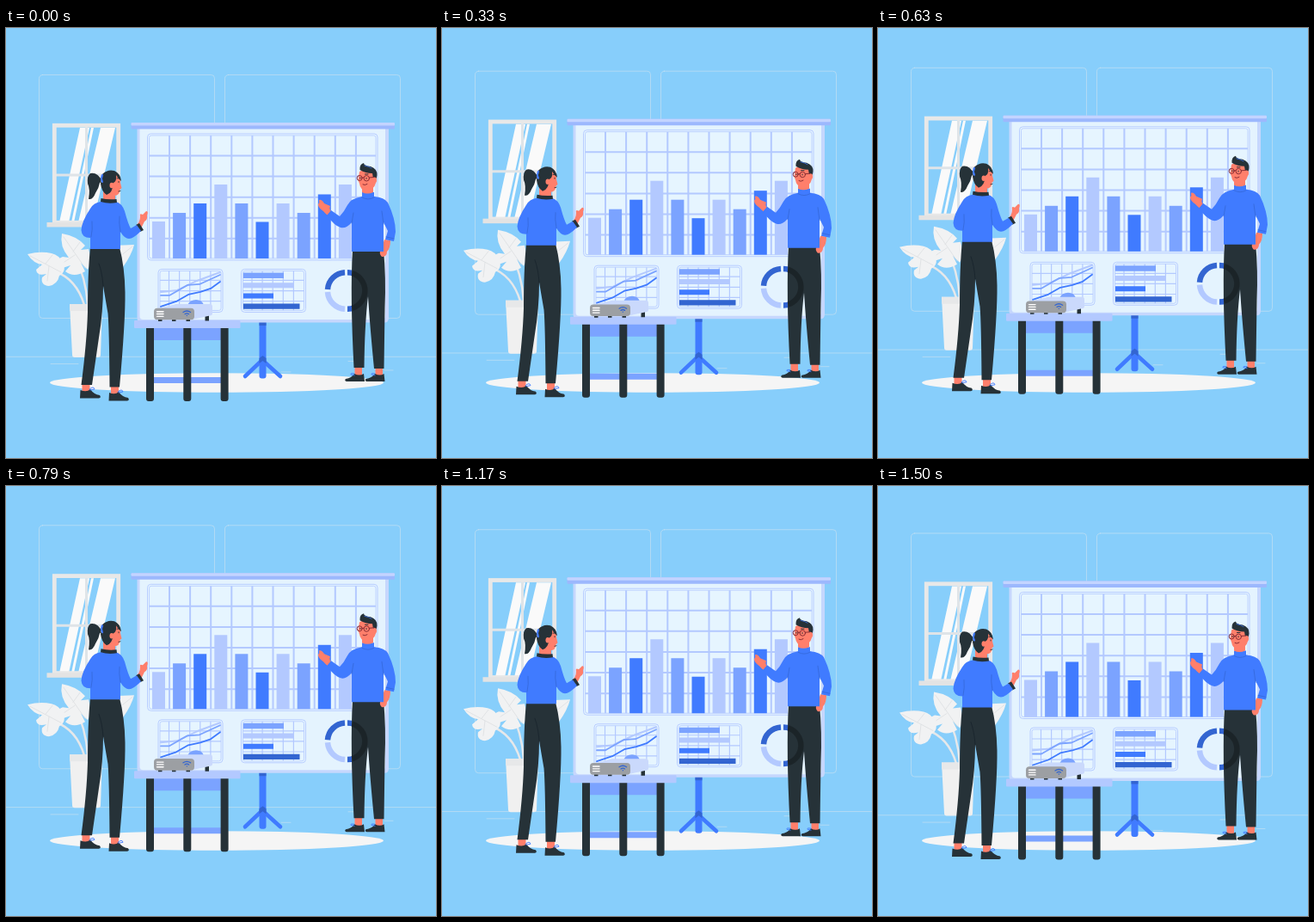
An HTML page that plays this animation: 500 by 500 pixels, repeating every 1540 ms.

```html
<!DOCTYPE html>
<html lang="en">
<head>
<meta charset="utf-8">
<title>Presentation</title>
<style>
  html, body { margin: 0; height: 100%; overflow: hidden; background: #87cefb; }
  svg { display: block; width: 100vw; height: 100vh; }
  .line { fill: none; stroke-linecap: round; stroke-linejoin: round; }
  .ink { fill: #263238; }
  .skin { fill: #ff7f6b; }
  .blue { fill: #407bff; }
  .mid { fill: #7ba3ff; }
  .pale { fill: #b3c9ff; }
  .deep { fill: #3365d1; }
  .leaf { fill: #f1f2f3; }
</style>
</head>
<body>
<svg viewBox="0 0 500 500">
  <g class="float">
    <g class="line" stroke="#ebebeb" stroke-width=".7" opacity=".6">
      <rect x="38.5" y="54.5" width="204" height="283" rx="4"/>
      <rect x="254.5" y="54.5" width="204" height="283" rx="4"/>
      <path d="M0 382.3H500M52 390.6H84M398 387.5H416M428 390.8H433M320 400H331M440 398H450"/>
    </g>

    <g id="window">
      <path fill="#fafafa" d="M86 116H97L73 226H62ZM99 116H102L79 226H76ZM110 116H127L101 226H84Z"/>
      <path class="line" stroke="#dfe4e8" stroke-width="3" d="M59 171H128M93.500 116V226"/>
      <rect x="56.300" y="113.300" width="74.400" height="113" fill="none" stroke="#e8e8e8" stroke-width="4.800"/>
      <rect x="47.500" y="226" width="92" height="5.500" fill="#e3e3e3"/>
    </g>

    <g id="plant">
      <path class="line" stroke="#e6e8ea" stroke-width="2.500" d="M57 283Q82 292 91 322M79 263Q93 290 95 322M134 264Q104 278 98 322"/>
      <path class="leaf" d="M25 263Q40 259 53 262Q62 264 66 273Q71 283 62 288Q60 298 50 300Q40 299 42 290L47 286Q36 289 35 281L42 275Q32 274 25 263Z"/>
      <path class="leaf" d="M65 239Q83 242 92 253L87 258L96 257Q101 272 95 281L87 273L92 283Q79 291 69 283L75 276L63 280Q54 271 66 266L73 267Q62 254 65 239Z"/>
      <path class="leaf" d="M149 252Q146 264 136 278Q125 283 117 270Q113 257 125 253Z"/>
      <path class="line" stroke="#dcdfe1" stroke-width=".8" d="M28 265L64 284M46 274L54 264M50 277L48 294M67 243L92 279M78 260L86 249M80 264L68 272M147 254L122 274"/>
      <path fill="#f0f0f0" d="M74 321H112L110 380Q110 383 107 383H80Q77 383 77 380Z"/>
      <path fill="#e7e8e9" d="M74 321H112L111.700 329H74.300Z"/>
    </g>
  </g>

  <ellipse cx="245" cy="412.500" rx="194" ry="11.300" fill="#f5f5f5"/>

  <g class="float">
    <g id="stand">
      <rect class="blue" x="294.500" y="340" width="8" height="67.500" rx="3"/>
      <path class="line" stroke="#407bff" stroke-width="4.600" d="M298 386L278 405M298 386L319 405"/>
      <path class="deep" d="M294.500 341H302.500V346H294.500ZM294.500 384L298.500 381L302.500 384V390L298.500 387L294.500 390Z"/>
    </g>

    <g id="board">
      <path fill="#c6d7fd" d="M152.500 115H445V337Q445 342.500 440 342.500H157Q152.500 342.500 152.500 337Z"/>
      <path fill="#e4f3fe" d="M155.500 115H441V335Q441 339 437 339H159.500Q155.500 339 155.500 335Z"/>
      <rect x="145.500" y="110" width="306.500" height="7.500" rx="1" fill="#9cb8fd"/>
      <rect x="145.500" y="110" width="306.500" height="3.500" rx="1" fill="#c3d4ff"/>
      <g id="charts"></g>
      <path class="line" stroke="#b3c9ff" stroke-width="2" d="M180 307L199 305L222 294L249 284"/>
      <path class="line" stroke="#7ba3ff" stroke-width="1.800" d="M180 311H190L211 299L225 298L249 287"/>
      <path class="line" stroke="#407bff" stroke-width="1.800" d="M180 324L198 318L212 310L226 307L238 303L249 295"/>
      <path class="mid" d="M276 284.500H323V291H276Z"/>
      <path class="pale" d="M276 296.300H335V302.300H276Z"/>
      <path class="blue" d="M276 308.500H311V314.500H276Z"/>
      <path class="deep" d="M276 320.500H341.500V326.800H276Z"/>
      <g fill="none" stroke-width="6.500">
        <path stroke="#3365d1" d="M374 304A21.300 21.300 0 0 1 394 284.200M397 284.200A21.300 21.300 0 0 1 397 326.800"/>
        <path stroke="#b3c9ff" d="M374 307A21.300 21.300 0 0 0 394 326.800"/>
      </g>
    </g>

    <g id="table">
      <path class="mid" d="M168 347H253V363H168ZM168 406H253V413H168Z"/>
      <path class="ink" d="M163 347H172V431Q172 434 169 434H166Q163 434 163 431ZM206.300 347H215.300V431Q215.300 434 212.300 434H209.300Q206.300 434 206.300 431ZM249.600 347H258.600V431Q258.600 434 255.600 434H252.600Q249.600 434 249.600 431Z"/>
      <rect class="pale" x="149" y="340" width="123.500" height="9" rx="1"/>
    </g>

    <g id="projector">
      <path class="mid" d="M211 322Q214 316 221 316Q228 316 230 322Z"/>
      <path class="ink" d="M177 338H181.500V341H177ZM193 338H197.500V341H193ZM209.500 338H214V341H209.500ZM231.500 333H236V340.500H231.500Z"/>
      <path fill="#cad9fc" d="M177 326L198 321H237Q240 321 240 324V332Q240 334 237 334.500L216 339Z"/>
      <rect x="172" y="325.800" width="47" height="13.600" rx="4" fill="#9c9fa3"/>
      <path class="line" stroke="#fff" stroke-width="1.400" d="M175.500 329.800H183M175.500 332.600H183M175.500 335.400H183"/>
      <path class="line" stroke="#3365d1" stroke-width="1.300" d="M206 330.500Q210.300 327.500 214.600 330.500M208 332.700Q210.300 331 212.600 332.700M210.300 334.500H210.400"/>
    </g>

    <g id="woman">
      <path class="skin" d="M88.500 411H97.500V423H88.500ZM122 414H131V426H122Z"/>
      <path class="ink" d="M86.500 421Q94 424 98 420Q102 426 109 427Q111 430 108 430.500H86ZM120 424Q127 427 131 423Q135 429 142 430Q144 433 141 433.500H119.500Z"/>
      <path class="line" stroke="#407bff" stroke-width=".9" d="M97 420Q102 416 103 420L98 421M130 423Q135 419 136 423L131 424"/>
      <path class="ink" d="M98 255H132Q138 278 138.500 307Q139 340 132 417.500H120.500Q120 350 118.500 332L113 300Q113 330 108 360L100 415H87.500Q94 365 95 330Q95 285 98 255Z"/>
      <path class="line" stroke="#16212a" stroke-width=".7" d="M113 300Q112 285 108 274"/>
      <path class="skin" d="M151 230Q156 226 156 219Q155 215 159 217L163 213Q166 213 164 218Q165 223 161 225L156 235Z"/>
      <path class="ink" d="M151 229L155 227L160 235L156 237Z"/>
      <path class="blue" d="M110 202Q102 203 98 210Q88 225 87.500 235Q88 244 98 244V257H133V237Q138 245 143 245Q148 245 157 236L152 229L145 233Q142 228 138 213Q135 204 128 202Z"/>
      <path class="line" stroke="#3365d1" stroke-width=".7" d="M99 243Q101 234 100 225M133 237Q131 226 132 219"/>
      <path class="skin" d="M113 189H127V200H113ZM119 174L130 170Q134 174 133 180L134.500 186L132.500 188Q132 195 126 195L118 190Z"/>
      <path class="ink" d="M110.500 198Q119 200 128.500 199L129 203Q119 205 110 202Z"/>
      <path class="ink" d="M112 178Q106 167 98 169Q94 172 95 181Q98 187 96 199Q101 200 104 192Q108 186 109 180ZM112 170Q118 164 126 166Q133 169 134 178Q130 175 128 171Q129 178 125 180Q124 192 117 194Q111 190 110 181Z"/>
      <path class="line" stroke="#407bff" stroke-width="2" d="M112 171Q110 175 112 179"/>
      <ellipse class="skin" cx="123" cy="183" rx="2.500" ry="3.200"/>
      <path class="line" stroke="#263238" stroke-width=".9" d="M129 175L132 174.500M131 178.500V179.500M131 190L133 189.500"/>
    </g>

    <g id="man">
      <path class="skin" d="M405.500 393H414V404H405.500ZM429.500 393H438V404H429.500Z"/>
      <path class="ink" d="M405 402Q411 405 416 402L417 411H396Q393 410 395 408Q402 407 405 402ZM429 402Q435 405 439.500 402L440.500 411H419.500Q416.500 410 418.500 408Q425.500 407 429 402Z"/>
      <path class="line" stroke="#407bff" stroke-width=".9" d="M405 402Q400 401 401 403L405 404M429 402Q424 401 425 403L429 404"/>
      <path class="ink" d="M403 258H439Q442 290 440.500 325L439.500 396H428Q423 345 421 312Q417 345 416.500 395H404.500Q400 310 403 258Z"/>
      <path fill="none" stroke="#000" stroke-opacity=".27" stroke-width="6.500" d="M402.500 285.200A21.300 21.300 0 0 1 402.500 325.800"/>
      <path class="skin" d="M440 246L447 247Q447 256 443 260Q443 266 437 266Q433 262 436 258ZM378 219Q374 219 369 213Q363 209 363 205Q365 203 364 200Q367 199 370 204L377 207Q375 211 379 214Z"/>
      <path class="blue" d="M414 191H428V196Q440 197 444 203Q453 222 453 237L451 248L441 246L444 236L439 226V260H402V226Q395 234 389 232Q382 230 373 218L378 212L388 219Q393 214 397 206Q401 198 414 196Z"/>
      <path class="line" stroke="#3365d1" stroke-width=".7" d="M414 197Q421 201 428 197M439 228L437 213M402 227L404 215M442 243L451 245"/>
      <path class="skin" d="M414 182H427V191Q420 194 414 191ZM411 167Q420 161 430 166L430 180Q428 189 418 189Q412 188 411 181L409.500 177Z"/>
      <path class="ink" d="M411.500 165Q411 158 416 157Q416 160 424 161Q432 164 431.500 171Q431 177 427.500 178L426 169Q418 169 411.500 165Z"/>
      <path class="line" stroke="#407bff" stroke-width=".7" d="M417 160Q422 161 425 163"/>
      <ellipse class="skin" cx="428.500" cy="177" rx="2.600" ry="3.400"/>
      <g class="line" stroke="#8b2f35" stroke-width="1">
        <circle cx="411.200" cy="174.500" r="3"/>
        <circle cx="419.300" cy="174.800" r="3.200"/>
        <path d="M414.200 174H416M422.500 174L428 173.500M415 182Q417 183.500 420 181.500"/>
      </g>
      <path class="line" stroke="#263238" stroke-width="1" d="M412 174V175M419 174.300V175.300M417.500 170L421 170"/>
    </g>
  </g>
</svg>

<script>
  const PERIOD = 1540, RISE = 10, LEAD = 40;

  // Rounded chart frame with evenly spaced grid lines.
  function panel(x, y, w, h, x0, y0, step, lineWidth) {
    let d = "";
    for (let gx = x0; gx < x + w - 4; gx += step) d += `M${gx} ${y + 2}V${y + h - 2}`;
    for (let gy = y0; gy < y + h - 4; gy += step) d += `M${x + 2} ${gy}H${x + w - 2}`;
    return `<rect x="${x}" y="${y}" width="${w}" height="${h}" rx="4" fill="#e6f5ff" stroke="#b3c9ff" stroke-width=".9"/>
      <rect x="${x + 2}" y="${y + 2}" width="${w - 4}" height="${h - 4}" rx="2.500" fill="none" stroke="#b3c9ff" stroke-width=".8"/>
      <path d="${d}" stroke="#b3c9ff" stroke-width="${lineWidth}"/>`;
  }

  const shades = ["pale", "mid", "blue"];
  const bars = [43, 53, 64, 86, 64, 42.5, 64, 53, 74.5, 86].map((h, i) =>
    `<rect class="${shades[i % 3]}" x="${170 + i * 24.1}" y="${268 - h}" width="15" height="${h}"/>`);

  document.getElementById("charts").innerHTML =
    panel(164.5, 123, 267.5, 147, 190, 148.5, 24.1, 2) + bars.join("") +
    panel(177, 280.5, 75, 50, 189.5, 293.5, 12.1, 1.2) +
    panel(273.5, 280.5, 75, 50, 286, 293.5, 12.1, 1.2);

  const floating = document.querySelectorAll(".float");
  function draw() {
    const phase = ((performance.now() + LEAD) % PERIOD) / PERIOD;
    const dy = 0.5 - RISE * (1 - Math.abs(1 - 2 * phase));
    floating.forEach(g => g.setAttribute("transform", `translate(0 ${dy.toFixed(3)})`));
    requestAnimationFrame(draw);
  }
  draw();
</script>
</body>
</html>
```
